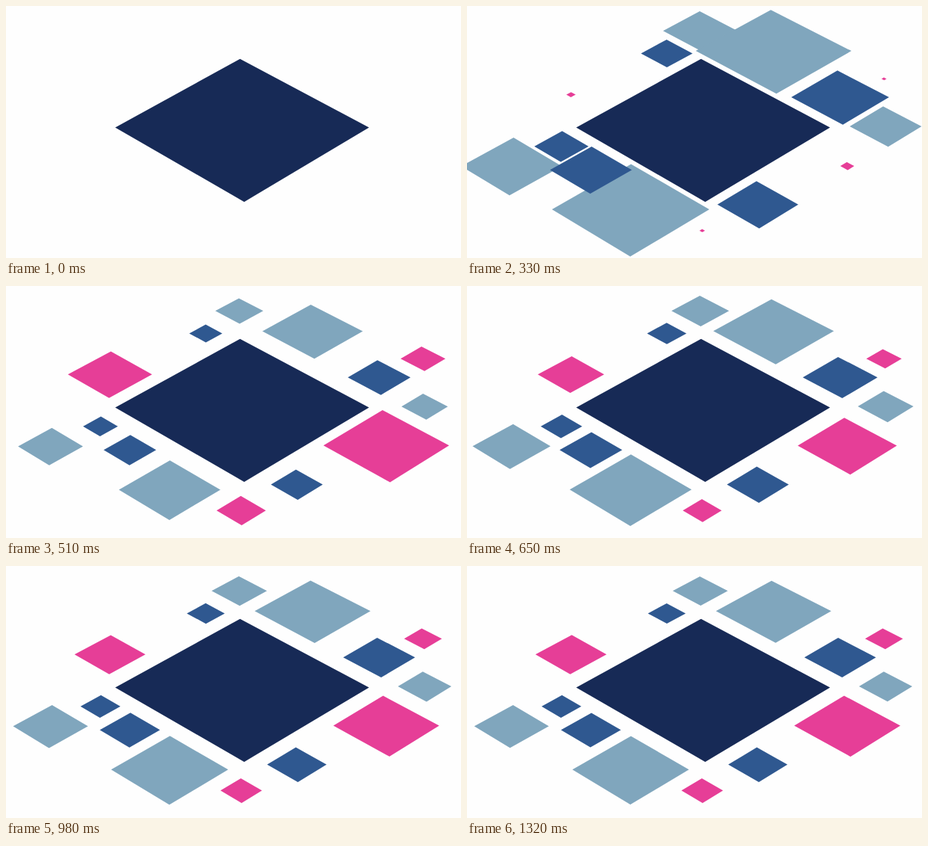
These frames come from a looping animation (607 by 337 pixels, 5.78 s). An HTML page:

```html
<!DOCTYPE html>
<html lang="en">
<head>
<meta charset="utf-8">
<title>Diamonds</title>
<style>
  html, body { margin: 0; width: 100%; height: 100%; overflow: hidden; background: #fefefe; }
  svg { display: block; width: 100%; height: 100%; }
</style>
</head>
<body>
<svg id="stage" viewBox="0 0 607 337"></svg>
<script>
const LOOP = 5780;
const POP_AT = 229;   // ms before the small diamonds spring out
const HOLD = 83;      // ms each picture stays

// Diamonds are [centre x, centre y, width]; start shifts the spring within its one second
const groups = [
  { fill: '#172a56', diamonds: [[315, 166.4, 338.6]] },
  { fill: '#80a6bd', start: 0.0443, diamonds: [
    [311.2, 33.5, 73.5], [409, 61.2, 153.8], [558.5, 161.3, 71],
    [59.4, 214.7, 99.5], [218.3, 273.2, 155.5]] },
  { fill: '#2f5890', start: 0.0508, diamonds: [
    [266.5, 63.5, 50.4], [497.8, 122.5, 95.5], [388, 265.8, 79],
    [126, 187.8, 53], [165.3, 219.5, 80]] },
  { fill: '#e63e97', start: -0.061, diamonds: [
    [138.7, 118.6, 94.8], [507.3, 214.2, 141.5], [313.8, 300.4, 55.5], [556.3, 97.4, 50.5]] }
];

const stage = document.getElementById('stage');
const parts = [];

// Corners of a square lying on the floor, seen in perspective
function corners(x, y, width) {
  const rx = width / 2;
  const ry = rx * (0.526 + 0.00023 * y);
  const lean = ry * 0.00039 * (240 - x);
  const side = -3.5e-5 * width * width;
  return [[-rx, side], [lean, -ry], [rx, side], [-lean, ry]].join(' ');
}

for (const { fill, start, diamonds } of groups) {
  for (const [x, y, width] of diamonds) {
    const el = document.createElementNS('http://www.w3.org/2000/svg', 'polygon');
    el.setAttribute('fill', fill);
    el.setAttribute('points', corners(x, y, width));
    stage.append(el);
    parts.push({ el, x, y, start });
  }
}

function elasticOut(t) {
  if (t <= 0) return 0;
  if (t >= 1) return 1;
  return 1 + 2 ** (-10 * t) * Math.sin((t - 0.075) * 2 * Math.PI / 0.3);
}

function draw(ms) {
  const step = Math.floor((ms - POP_AT) / HOLD);
  // The spring advances in fortieths of a second
  const progress = step < 0 ? -1 : Math.round(step * 3.25) / 40;
  for (const { el, x, y, start } of parts) {
    const k = start === undefined ? 1 : elasticOut(progress + start);
    el.setAttribute('visibility', k > 0 ? 'visible' : 'hidden');
    el.setAttribute('transform', `translate(${x} ${y}) scale(${k})`);
  }
}

const began = performance.now();
function tick() {
  draw((performance.now() - began) % LOOP);
  requestAnimationFrame(tick);
}
tick();
</script>
</body>
</html>
```
